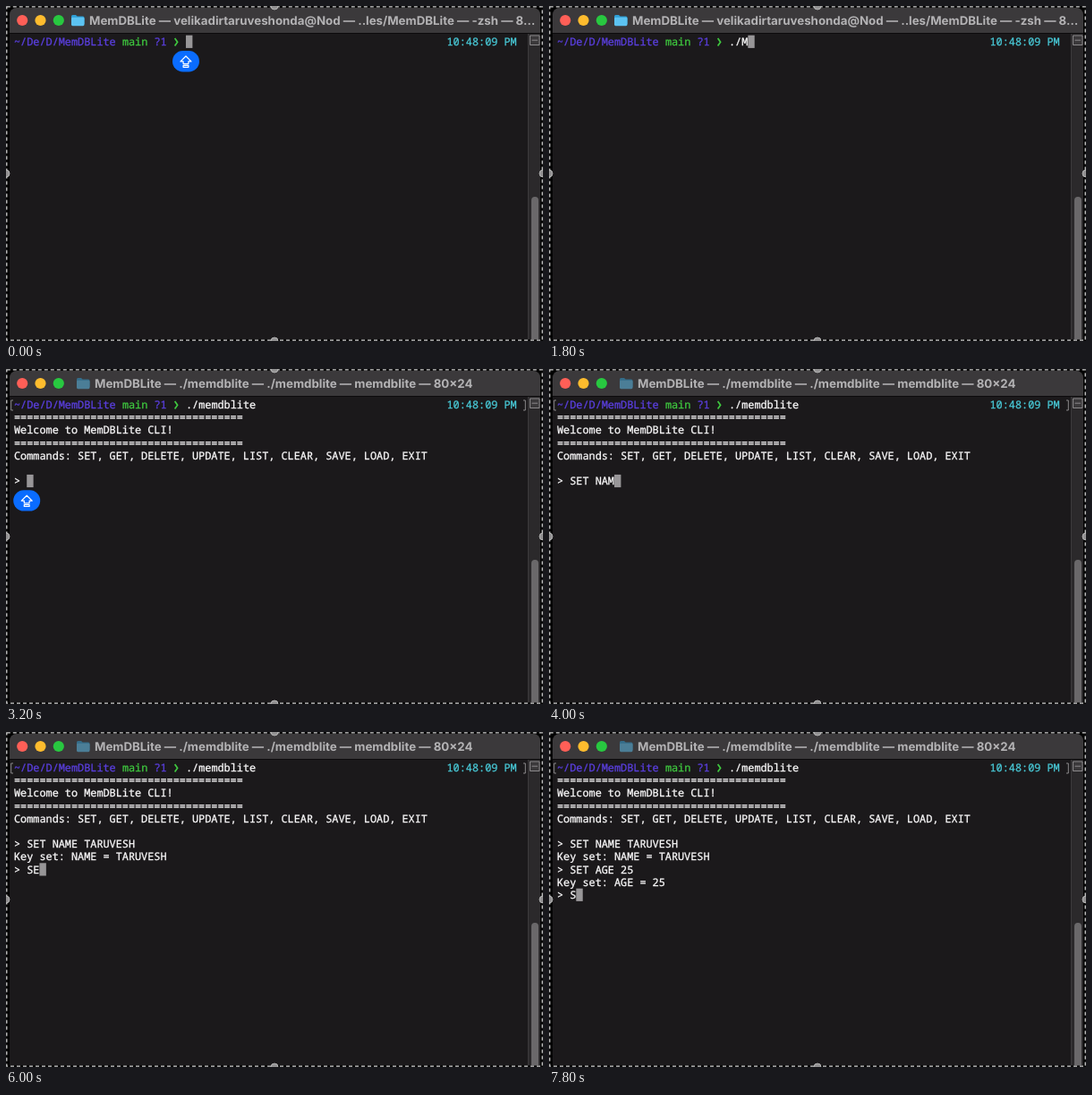
An HTML page for the animation above (8000 ms loop, 600x374 px).

```html
<!DOCTYPE html>
<html lang="en">
<head>
<meta charset="utf-8">
<title>Terminal session</title>
<style>
  html, body { margin: 0; width: 100%; height: 100%; overflow: hidden; background: #000; }
  svg { display: block; width: 100%; height: 100%; }
  text { white-space: pre; text-rendering: geometricPrecision; }
  .mono {
    font: 500 11.85px "Noto Sans Mono", "DejaVu Sans Mono", monospace;
    color: #fbfafb; fill: currentColor; stroke: currentColor; stroke-width: .3;
  }
  .mono text { fill: currentColor; stroke: currentColor; }
  .path { color: #5a3fde; }
  .branch { color: #3fc83f; }
  .clock { color: #48c8d6; }
  .title { font: 700 13.3px Inter, "Open Sans", sans-serif; fill: #b4b3b5; }
</style>
</head>
<body>
<svg viewBox="0 0 600 374">
  <rect width="600" height="374" fill="#000"/>
  <path d="M4 374V10a8 8 0 0 1 8-8H589a8 8 0 0 1 8 8V374Z" fill="#1b191b"/>
  <path d="M4 30V10a8 8 0 0 1 8-8H589a8 8 0 0 1 8 8V30Z" fill="#3b393b"/>
  <path d="M4 30.5H597" stroke="#0c0b0c"/>

  <circle cx="18.2" cy="16" r="6.1" fill="#ff5f57"/>
  <circle cx="38.5" cy="16" r="6.1" fill="#febc2e"/>
  <circle cx="58.8" cy="16" r="6.1" fill="#28c840"/>

  <g id="heading">
    <g id="folder">
      <path d="M0 11.5a1.5 1.5 0 0 1 1.5-1.5H5l1.6 1.6H13a1.5 1.5 0 0 1 1.5 1.5V20H0Z" fill="#2f9fd6"/>
      <rect y="12.8" width="14.5" height="9.4" rx="1.4" fill="#5cc3f2"/>
    </g>
    <text id="title" class="title" x="20" y="20.8"></text>
  </g>

  <!-- scroll bar -->
  <rect x="583" y="31" width="14" height="343" fill="#2b292b"/>
  <path d="M583.5 31V374" stroke="#3d3b3d"/>
  <rect x="587" y="213" width="8" height="170" rx="4" fill="#6a686a"/>
  <path d="M585.5 33h10.5v10.5h-10.5ZM587.5 38.2h6.5" fill="#3b393b" stroke="#8b898b"/>

  <!-- prompt -->
  <g class="mono">
    <text class="path" x="9" y="44">~/De/D/MemDBLite</text>
    <text class="branch" x="129.9" y="44">main</text>
    <text class="path" x="165.4" y="44">?1</text>
    <text class="clock" x="492.5" y="44">10:48:09 PM</text>
  </g>
  <path d="M188.6 36l3 4.3-3 4.3" fill="none" stroke="#3fc83f" stroke-width="1.7"/>
  <path id="marks" d="M8 35H5.7V46H8M578 35h2.3V46H578" fill="none" stroke="#8c8a8c"/>

  <rect id="cursor" width="7.4" height="14.2" fill="#989698"/>
  <g id="lines" class="mono"></g>

  <g id="caps">
    <rect x="-15" y="10" width="30" height="23.4" rx="11.7" fill="#0a6cff"/>
    <path d="M0 16l6 5.9H2.9v2.7H-2.9v-2.7H-6ZM-2.9 26.4h5.8v1.9h-5.8Z"
      fill="none" stroke="#fff" stroke-width="1.2" stroke-linejoin="round"/>
  </g>

  <!-- selection border -->
  <rect x=".8" y=".8" width="598.4" height="372.4" fill="none" stroke="#000" stroke-width="1.6"/>
  <rect x=".8" y=".8" width="598.4" height="372.4" fill="none" stroke="#d2d2d2" stroke-width="1.3" stroke-dasharray="4 3"/>
  <g fill="#929192" stroke="#c4c4c4" stroke-width=".8">
    <circle cx="300" cy="0" r="4"/><circle cx="300" cy="374" r="4"/>
    <circle cx="0" cy="187" r="4"/><circle cx="600" cy="187" r="4"/>
  </g>
</svg>
<script>
  const LOOP = 8000, COL = 7.11, ROW = 14.2, LEFT = 9;
  const $ = id => document.getElementById(id);

  // [time, x, window title]
  const TITLES = [
    [0, 73, "MemDBLite — velikadirtaruveshonda@Nod — ..les/MemDBLite — -zsh — 8…"],
    [2600, 99, "MemDBLite — ./memdblite — ./memdblite — -zsh — 80×24"],
    [2800, 79, "MemDBLite — ./memdblite — ./memdblite — memdblite — 80×24"]
  ];

  // [time, row, text typed so far]
  const TYPING = [
    [0, 0, ""], [1400, 0, "."], [1600, 0, "./"], [1800, 0, "./M"],
    [2000, 0, "./"], [2200, 0, "./me"], [2400, 1, ""],
    [2600, 6, ""], [3600, 6, "S"], [3800, 6, "SET "], [4000, 6, "SET NAM"],
    [4200, 6, "SET NAME"], [4400, 6, "SET NAME "], [4600, 6, "SET NAME T"],
    [4800, 6, "SET NAME TAR"], [5000, 6, "SET NAME TARU"],
    [5200, 6, "SET NAME TARUVE"], [5400, 6, "SET NAME TARUVESH"],
    [5600, 8, ""], [5800, 8, "S"], [6000, 8, "SE"], [6200, 8, "SET"],
    [6400, 8, "SET A"], [6600, 8, "SET AG"], [6800, 8, "SET AGE "],
    [7000, 8, "SET AGE 2"], [7200, 8, "SET AGE 25"],
    [7600, 10, ""], [7800, 10, "S"]
  ];

  // [time, row, printed line]
  const RULE = "=".repeat(36);
  const OUTPUT = [
    [2400, 0, "./memdblite"],
    [2600, 1, RULE],
    [2600, 2, "Welcome to MemDBLite CLI!"],
    [2600, 3, RULE],
    [2600, 4, "Commands: SET, GET, DELETE, UPDATE, LIST, CLEAR, SAVE, LOAD, EXIT"],
    [5600, 6, "> SET NAME TARUVESH"],
    [5600, 7, "Key set: NAME = TARUVESH"],
    [7600, 8, "> SET AGE 25"],
    [7600, 9, "Key set: AGE = 25"]
  ];

  // [from, to, column, row] of the caps lock badge
  const BADGES = [[0, 1400, 27, 0], [3000, 3800, 2, 6], [5800, 6000, 2, 8]];

  const rows = Array.from({ length: 11 }, (_, i) => {
    const el = document.createElementNS("http://www.w3.org/2000/svg", "text");
    el.setAttribute("x", LEFT + (i ? 0 : 27 * COL));
    el.setAttribute("y", 44 + i * ROW);
    return $("lines").appendChild(el);
  });

  const current = (list, t) => list.filter(e => e[0] <= t).pop();
  const move = (id, x, y) => $(id).setAttribute("transform", `translate(${x} ${y})`);
  const show = (id, on) => $(id).setAttribute("visibility", on ? "visible" : "hidden");

  function draw(t) {
    const [, x, title] = current(TITLES, t);
    move("heading", x, 0);
    $("title").textContent = title;
    $("folder").setAttribute("opacity", t < 2800 ? 1 : 0.5);
    show("marks", t >= 2400);

    const text = rows.map(() => "");
    for (const [at, row, line] of OUTPUT) if (t >= at) text[row] = line;

    const [, row, typed] = current(TYPING, t);
    const prefix = row > 1 ? "> " : "";
    if (row !== 1) text[row] = prefix + typed;
    rows.forEach((el, i) => { el.textContent = text[i]; });

    const col = (row ? prefix.length : 27) + typed.length;
    move("cursor", LEFT + col * COL, 32.7 + row * ROW);

    const badge = BADGES.find(([from, to]) => t >= from && t < to);
    show("caps", badge);
    if (badge) move("caps", LEFT + badge[2] * COL, 40 + badge[3] * ROW);
  }

  const start = performance.now();
  function tick() {
    draw((performance.now() - start) % LOOP);
    requestAnimationFrame(tick);
  }
  tick();
</script>
</body>
</html>
```
